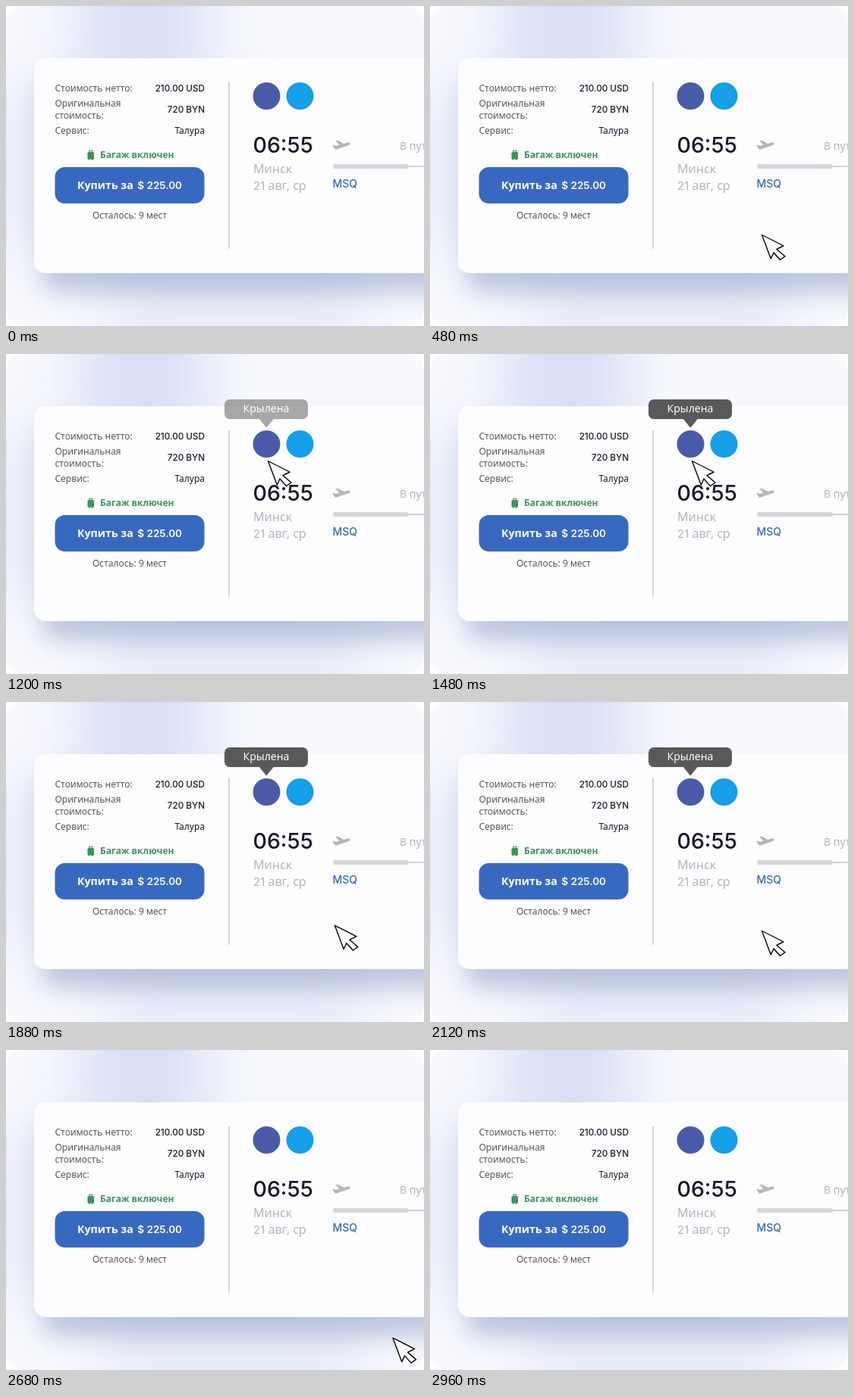
An HTML page that plays this animation: 551 by 423 pixels, repeating every 3.06 s.

```html
<!DOCTYPE html>
<html lang="ru">
<head>
<meta charset="utf-8">
<style>
  html, body { margin: 0; width: 100%; height: 100%; overflow: hidden; background: #fff; }
  svg { display: block; width: 551px; height: 423px; font: 12px "Noto Sans", "Open Sans", sans-serif; }
  .label { fill: #55555c; }
  .dark { fill: #17142f; }
  .muted { fill: #b5b3bf; }
  .num { font-family: Inter, Roboto, sans-serif; font-weight: 500; }
  .end { text-anchor: end; }
  .mid { text-anchor: middle; }
</style>
</head>
<body>
<svg viewBox="0 0 551 423">
  <defs>
    <clipPath id="stage"><rect width="551" height="423" rx="24"/></clipPath>
    <filter id="soft" filterUnits="userSpaceOnUse" x="-200" y="-250" width="950" height="900"><feGaussianBlur stdDeviation="38"/></filter>
    <filter id="shadow" x="-20%" y="-30%" width="140%" height="160%"><feGaussianBlur stdDeviation="17"/></filter>
  </defs>
  <g clip-path="url(#stage)">
    <rect width="551" height="423" fill="#f8f9fe"/>
    <g filter="url(#soft)" fill="#d9dff4">
      <rect x="95" y="-120" width="170" height="260"/>
      <rect x="-20" y="110" width="90" height="210" opacity=".6"/>
      <rect x="130" y="350" width="340" height="110" opacity=".55"/>
    </g>
    <rect x="48" y="98" width="560" height="280" rx="14" fill="#6079b2" opacity=".4" filter="url(#shadow)"/>
    <rect x="37" y="69" width="560" height="284" rx="15" fill="#fdfdff"/>

    <g class="label">
      <text x="64.500" y="113">Стоимость нетто:</text>
      <text x="64.500" y="133">Оригинальная</text>
      <text x="64.500" y="149">стоимость:</text>
      <text x="64.500" y="169">Сервис:</text>
      <text class="mid" x="163" y="281">Осталось: 9 мест</text>
    </g>
    <g class="dark end">
      <text class="num" font-size="11.700" x="262" y="113">210.00 USD</text>
      <text class="num" font-size="11.700" x="262" y="141">720 BYN</text>
      <text x="262" y="169">Талура</text>
    </g>

    <g fill="#3a9459">
      <path d="M110 193v-2h3.500v2" fill="none" stroke="#3a9459" stroke-width="1.200"/>
      <rect x="107.500" y="193" width="8.500" height="9.500" rx="1.500"/>
      <path d="M108.500 202h2v1.500h-2zM113 202h2v1.500h-2z"/>
      <text x="124" y="201" font-weight="700">Багаж включен</text>
    </g>

    <rect x="64.500" y="213" width="197" height="48" rx="13" fill="#3869c0"/>
    <g fill="#fff" font-weight="600">
      <text x="94" y="242" font-size="14.200">Купить за</text>
      <text x="232" y="242" class="num end" font-size="13.500" style="font-weight:600">$ 225.00</text>
    </g>

    <rect x="293" y="101" width="2" height="220" fill="#d5d5dc"/>
    <circle cx="343.500" cy="119" r="18" fill="#4a5ca8"/>
    <circle cx="387.500" cy="119" r="18" fill="#159fe9"/>

    <text class="num dark" x="325.500" y="194" font-size="28.500">06:55</text>
    <g class="muted" font-size="16">
      <text x="326" y="221">Минск</text>
      <text x="326" y="243"><tspan class="num" font-size="15" style="font-weight:400">21</tspan> авг, ср</text>
      <text x="519" y="190" font-size="14">В пути</text>
    </g>
    <path class="muted" d="M453.700 181.500q-.7-1.700-2.600-1.200l-5.600 1.800-8.500-4.600-2.500.8 5.300 5.300-5 1.500-2.600-1.300-1.700.5 3 4.700q.7 1 2 .6l16.500-5.500q2.200-.9 1.700-2.600z"/>
    <rect x="531" y="211" width="20" height="2" fill="#d3d3df"/>
    <rect x="431" y="209" width="100" height="6" rx="3" fill="#d6d6da"/>
    <text class="num" x="430.500" y="240" font-size="14" fill="#3869c0">MSQ</text>

    <g id="tip" opacity="0">
      <rect x="288" y="60" width="110" height="26" rx="7" fill="#595959"/>
      <path d="M333.500 85.500h19.500l-9.700 12z" fill="#595959"/>
      <text class="mid" x="343" y="77" font-size="14" fill="#fff">Крылена</text>
    </g>
    <path id="cursor" d="M0 0L28.500 14.500 19.500 19 30.500 28.500 24 33 15.500 23.500 11.800 31.500Z" fill="#fff" stroke="#000" stroke-width="1.400" stroke-linejoin="round"/>
  </g>
</svg>
<script>
  const LOOP = 3060;
  const tip = document.getElementById("tip");
  const cursor = document.getElementById("cursor");

  // Keys: time, then values
  const path = [
    [40, 565, 440], [470, 437.5, 302.5], [520, 437.5, 302.5], [980, 345.5, 141.5],
    [1520, 345.5, 141.5], [1985, 437.5, 302.5], [2440, 437.5, 302.5], [2900, 565, 440]
  ];
  const fade = [[1080, 0], [1320, 1], [2140, 1], [2390, 0]];

  const ease = p => p < .5 ? 4 * p ** 3 : 1 - 4 * (1 - p) ** 3;

  function at(keys, t) {
    const next = keys.findIndex(k => k[0] > t);
    if (next < 0) return keys[keys.length - 1].slice(1);
    if (next === 0) return keys[0].slice(1);
    const a = keys[next - 1], b = keys[next];
    const p = ease((t - a[0]) / (b[0] - a[0]));
    return a.slice(1).map((v, i) => v + (b[i + 1] - v) * p);
  }

  const start = performance.now();
  function draw(now) {
    const t = Math.max(0, now - start) % LOOP;
    cursor.setAttribute("transform", `translate(${at(path, t)})`);
    tip.setAttribute("opacity", at(fade, t)[0]);
    requestAnimationFrame(draw);
  }
  draw(start);
</script>
</body>
</html>
```
